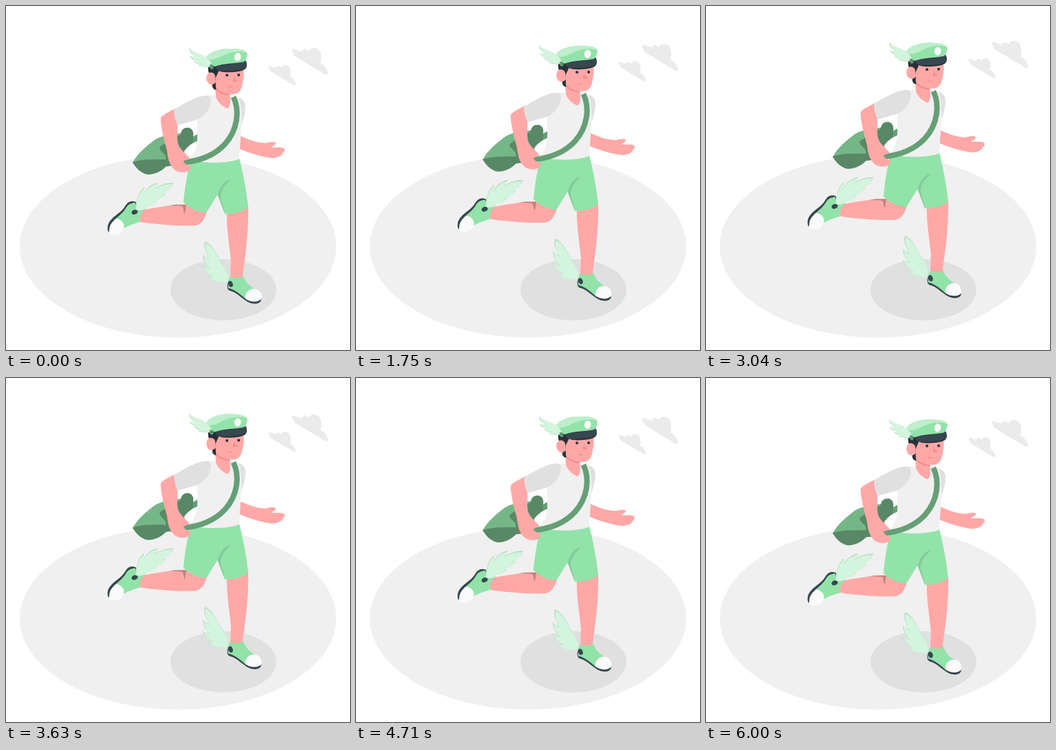
These frames come from a looping animation (500x500 px, 6.04 s). An HTML page:

```html
<!DOCTYPE html>
<html lang="en">
<head>
<meta charset="utf-8">
<title>Winged courier</title>
<style>
  html, body { margin: 0; width: 100%; height: 100%; overflow: hidden; background: #fff; }
  svg { display: block; width: 100%; height: 100%; }
  .skin { fill: #ffa8a7; }
  .blush { fill: #f28f8f; }
  .green { fill: #92e3a9; }
  .mid { fill: #75b687; }
  .deep { fill: #588865; }
  .ink { fill: #263238; }
  .slate { fill: #37474f; }
  .shirt { fill: #f0f0f0; }
  .shade { fill: #e0e0e0; }
  .white { fill: #fafafa; }
  .feather { fill: #d3f4dd; }
  .quill { fill: #bedcc7; }
</style>
</head>
<body>
<svg viewBox="0 0 500 500">
  <defs>
    <path id="cloud" d="M416 63C419 61 424 64 427 69C428 64 434 64 436 67M416 63C419 61 424 64 427 69C427 65 430 66 431 68C428 63 436 60 440 66C442 60 450 59 455 64C459 69 459 77 457 84C462 85 467 92 468 97C468 100 466 101 463 99L420 73C418 72 417 70 419 69C416 68 415 65 416 63Z"/>
    <path id="hatWing" d="M266 61C269 67 279 68 286 72C291 75 294 78 296 80L300 87C296 90 288 89 279 87C281 86 283 86 284 85C279 85 275 83 273 80C275 80 277 80 278 79C272 79 268 76 267 73C270 74 273 74 274 73C269 70 266 66 266 61Z"/>
    <path id="backWing" d="M188 296C189 284 192 269 201 264C201 267 200 270 200 272C205 264 212 258 221 257C220 260 217 263 216 265C224 260 232 257 243 257C241 264 235 269 229 272C230 273 231 273 232 273C228 279 221 282 215 284L219 285C215 290 209 291 203 292C201 297 194 298 188 296Z"/>
    <path id="frontWing" d="M289 342C297 345 303 354 308 363C310 369 313 372 317 378C322 386 325 393 322 400C319 404 315 402 312 401C305 401 297 399 293 393C296 394 299 394 301 393C294 390 287 384 286 377C289 380 293 381 296 381C290 376 286 369 286 361C288 364 292 366 295 367C290 359 287 350 289 342Z"/>
  </defs>

  <ellipse cx="250" cy="349.5" rx="230" ry="132.5" fill="#f0f0f0"/>
  <ellipse cx="316" cy="412.5" rx="77" ry="44.5" class="shade"/>

  <g id="clouds" fill="#ebebeb">
    <use href="#cloud"/>
    <use href="#cloud" transform="translate(70 40.3) scale(.75)"/>
  </g>

  <g id="runner">
    <!-- bag -->
    <path class="mid" d="M184 228C190 215 205 203 217 194C228 187 245 187 258 184L260 225L234 233L184 228Z"/>
    <path class="deep" d="M184 227C198 222 217 223 232 223L240 220L245 232L233 233C224 242 214 245 206 245C195 243 188 234 184 227Z"/>
    <path class="deep" d="M223 206C227 200 234 201 236 194C237 187 250 192 254 186C255 179 260 176 266 177C272 179 273 184 272 190L279 186V196C269 199 262 206 257 214L246 232H233C232 225 234 219 230 215C227 212 224 210 223 206Z"/>
    <path d="M272 190L279 186V195L272 199Z" fill="#669f76"/>

    <!-- far arm -->
    <path class="skin" d="M341 189C352 194 362 198 374 199C380 200 386 196 391 198C394 200 390 203 385 205C391 206 397 205 402 206C406 207 406 210 403 213C400 219 393 221 386 221C370 219 352 213 338 207Z"/>

    <!-- legs -->
    <path class="skin" d="M262 288C240 289 215 293 197 297C193 302 193 310 196 314C220 318 255 320 275 319C284 318 289 309 292 299Z"/>
    <path d="M237 290C246 288 254 289 262 289L260 302C257 298 259 294 256 291C250 290 243 290 237 290Z" fill="#bd8580"/>
    <path class="skin" d="M321 298C320 320 325 350 327 370L326 394C332 398 340 398 344 394C347 365 353 335 352 290Z"/>

    <!-- shorts -->
    <path class="green" d="M269 222C285 230 330 228 339 221C344 240 350 270 352 292C343 301 325 303 318 302L307.500 274L291.500 300C283 301 265 294 258 285C260 262 264 240 269 222Z"/>
    <path d="M327 252C317 254 313 260 307.500 274L318 302C317 291 311 281 312 275C315 262 320 259 327 252Z" fill="#83cc98"/>

    <!-- back shoe -->
    <path class="slate" d="M189 285C183 282 177 284 173 291C167 302 152 306 148 319C147 325 148 329 151 329L190 293Z"/>
    <path class="green" d="M188 286L190 294C196 296 199 293 203 294C198 299 193 305 195 314C187 316 178 319 172 323L157 311C165 305 171 299 174 294C177 288 183 286 188 286Z"/>
    <path class="white" d="M161 309C169 311 173 317 171 323C170 329 164 333 157 333C152 333 149 331 150 326C150 319 155 312 161 309Z"/>
    <ellipse class="slate" cx="187" cy="299.5" rx="4.6" ry="3.3" transform="rotate(-25 187 299.5)"/>
    <use href="#backWing" class="quill"/>
    <use href="#backWing" class="feather" transform="translate(9.9 14.2) scale(.952)"/>

    <!-- front shoe -->
    <path class="slate" d="M322 403C321 409 322 413 326 414C336 416 346 429 356 432C364 434 371 432 371 426L350 416Z"/>
    <path class="green" d="M326 393C332 396 341 396 345 392C347 401 355 408 363 412L350 427C342 421 334 412 323 410C322 403 323 398 326 393Z"/>
    <path class="white" d="M348 425C347 417 353 411 361 411C368 412 373 418 371 426C366 431 354 431 348 425Z"/>
    <use href="#frontWing" class="quill"/>
    <use href="#frontWing" class="feather" transform="translate(15.3 19.3) scale(.952)"/>
    <ellipse class="slate" cx="326.3" cy="404" rx="3.3" ry="4.6" transform="rotate(-22 326.3 404)"/>

    <!-- shirt and strap -->
    <path class="shirt" d="M289 131L305 130C309 140 316 146 322 148C326 144 326 138 326 132C336 131 346 134 347 143C348 155 344 165 342 175L339 222C330 228 285 231 268 222C276 212 279 200 278 185V160Z"/>
    <path class="shade" d="M338 133C345 135 348 140 348 146C348 156 345 165 343 172C342 162 343 145 338 133Z"/>
    <path d="M330.500 132C340 152 337 180 318 201C303 217 283 225 258 227.500" fill="none" stroke="#669f76" stroke-width="8"/>

    <!-- near arm -->
    <path class="skin" d="M246 149C239 153 229 157 225 162C224 173 230 195 234 210C235 222 238 232 245 238C252 243 262 243 267 238L268 232C263 231 259 229 258 225L267 222C264 216 253 210 250 200C248 190 250 180 249 172Z"/>
    <path class="shade" d="M244 151C255 143 275 133 285 131C293 129 299 131 298 138C297 151 287 162 275 166L250 173C246 168 245 160 244 151Z"/>

    <!-- head -->
    <path class="skin" d="M304 116L305 132C308 141 316 147 322 149C326 146 327 140 325 124Z"/>
    <path class="blush" d="M305 118C311 124 318 127 326 127L325 130C317 130 309 126 305 121Z"/>
    <path class="ink" d="M294 83H312V96L305 122C301 121 299 118 300 111L296 99C293 95 294 89 294 83Z"/>
    <path class="skin" d="M311 90C309 95 307 100 304.500 105L305 119C311 124 320 129 332 128C340 127 343 119 344 111C346 104 346 97 345 88Z"/>
    <path class="skin" d="M304 101C302 96 296 95 293 99C290 103 291 110 295 113C299 116 303 113 305 111Z"/>
    <path class="blush" d="M332 101L329.500 109C332 111 335 110 337 108C333 107 332 105 332 101Z"/>
    <path d="M323 116Q326 119 329 117.500" fill="none" stroke="#e87f80"/>
    <circle class="ink" cx="321.2" cy="100.500" r="2"/>
    <circle class="ink" cx="338.2" cy="100.200" r="2"/>

    <!-- hat -->
    <path class="ink" d="M301 86L347 80C351 83 351 89 347 92C341 96 326 97 315 96C309 95 303 92 301 86Z"/>
    <path class="slate" d="M303 87C318 85 334 85 348 79C351 82 350 88 348 90C338 95 322 94 312 95C308 94 305 91 303 87Z"/>
    <path class="green" d="M290 77C293 67 312 61 330 62C343 62 351 66 351 70C350 76 348 79 346 81C332 84 316 83 303 88C297 85 292 81 290 77Z"/>
    <path d="M290 77C293 67 310 61 328 62C340 62 350 64 350 68C338 64 325 67 313 73C304 78 297 79 290 77Z" fill="#beeecb"/>
    <ellipse class="white" cx="336.700" cy="74" rx="4.800" ry="6" transform="rotate(10 336.700 74)"/>
    <use href="#hatWing" class="quill"/>
    <use href="#hatWing" class="feather" transform="translate(9 2) scale(.97)"/>
    <ellipse cx="298.700" cy="88.300" rx="2.700" ry="3.700" transform="rotate(-20 298.700 88.300)" fill="#669f76"/>
    <ellipse class="deep" cx="299.200" cy="88.300" rx="1.300" ry="2" transform="rotate(-20 299.200 88.300)"/>
  </g>
</svg>
<script>
  const LOOP = 6040, PERIOD = 6000, DELAY = 500, LIFT = 10, FPS = 24;
  const clouds = document.getElementById('clouds');
  const runner = document.getElementById('runner');
  const start = performance.now();

  // Linear rise and fall, resting before zero
  const lift = ms => -LIFT * (1 - Math.abs(1 - 2 * Math.max(0, ms) / PERIOD));
  const moveY = (el, y) => el.setAttribute('transform', `translate(0 ${y.toFixed(3)})`);

  function draw(now) {
    const ms = Math.max(0, now - start) % LOOP;
    const step = ms < DELAY ? 250 : 1000 / FPS;
    const t = Math.min(PERIOD, Math.floor(ms / step + 1e-6) * step);
    moveY(clouds, lift(t));
    moveY(runner, lift(t - DELAY));
    requestAnimationFrame(draw);
  }
  draw(start);
</script>
</body>
</html>
```
